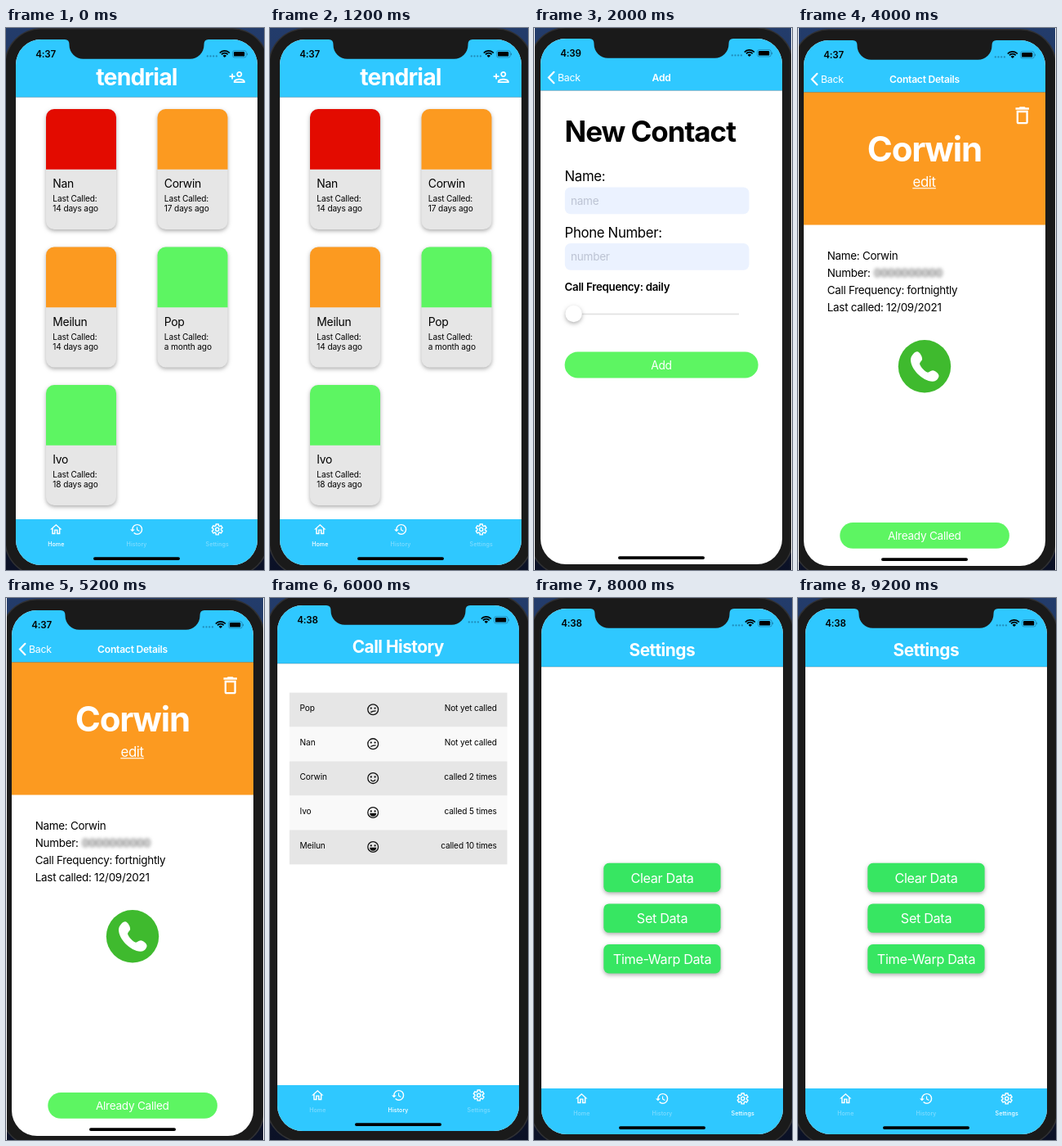
Write an HTML page with a canvas that moves like this. It is 316 by 662 pixels and loops after 10000 ms.

```html
<!DOCTYPE html>
<html lang="en">
<head>
<meta charset="utf-8">
<title>Call reminder app</title>
<style>
html, body { margin: 0; width: 100%; height: 100%; overflow: hidden; background: #fff; }
canvas { display: block; width: 316px; height: 662px; }
</style>
</head>
<body>
<canvas id="stage"></canvas>
<script>
const W = 316, H = 662, HOLD = 2000;
const BLUE = '#2fc8ff', GREEN = '#5df562', ORANGE = '#fc9a20', RED = '#e30b00', GREY = '#e6e6e6';
const canvas = document.getElementById('stage');
const c = canvas.getContext('2d');
const dpr = window.devicePixelRatio || 1;
canvas.width = W * dpr;
canvas.height = H * dpr;

const ICON = {
  addPerson: new Path2D('M15 12c2.21 0 4-1.79 4-4s-1.79-4-4-4-4 1.79-4 4 1.79 4 4 4zm0-6c1.1 0 2 .9 2 2s-.9 2-2 2-2-.9-2-2 .9-2 2-2zm0 8c-2.67 0-8 1.34-8 4v2h16v-2c0-2.66-5.33-4-8-4zm-6 4c.22-.72 3.31-2 6-2 2.7 0 5.8 1.29 6 2H9zm-3-3v-3h3v-2H6V7H4v3H1v2h3v3z'),
  home: new Path2D('M12 5.69l5 4.5V18h-2v-6H9v6H7v-7.81l5-4.5M12 3L2 12h3v8h6v-6h2v6h6v-8h3L12 3z'),
  history: new Path2D('M13 3a9 9 0 0 0-9 9H1l3.89 3.89.07.14L9 12H6c0-3.87 3.13-7 7-7s7 3.13 7 7-3.13 7-7 7c-1.93 0-3.68-.79-4.94-2.06l-1.42 1.42A8.954 8.954 0 0 0 13 21a9 9 0 0 0 0-18zm-1 5v5l4.28 2.54.72-1.21-3.5-2.08V8H12z'),
  trash: new Path2D('M6 19c0 1.1.9 2 2 2h8c1.1 0 2-.9 2-2V7H6v12zM8 9h8v10H8V9zm7.5-5l-1-1h-5l-1 1H5v2h14V4z'),
  handset: new Path2D('M-9-18C-6-18-2-11-3-8C-4-6-6-5-6-3C-5 1 1 7 4 7.500C6 7.500 7 5 10 5C13 5 18 9 17.500 12C17 15 14 18.500 10 18.500C-3 18-17 3-17-8C-17-13-12-18-9-18Z')
};

function text(str, x, y, size, { weight = 400, color = '#000', align = 'left', track = -0.02 } = {}) {
  c.font = `${weight} ${size}px Inter, "Liberation Sans", sans-serif`;
  c.letterSpacing = `${size * track}px`;
  c.textAlign = align;
  c.fillStyle = color;
  c.fillText(str, x, y);
}

function rect(x, y, w, h, color) {
  c.fillStyle = color;
  c.fillRect(x, y, w, h);
}

function pill(x, y, w, h, r, color) {
  c.fillStyle = color;
  c.beginPath();
  c.roundRect(x, y, w, h, r);
  c.fill();
}

function disc(x, y, r, color) {
  c.fillStyle = color;
  c.beginPath();
  c.arc(x, y, r, 0, Math.PI * 2);
  c.fill();
}

function line(points, width, color) {
  c.strokeStyle = color;
  c.lineWidth = width;
  c.beginPath();
  points.forEach(([x, y]) => c.lineTo(x, y));
  c.stroke();
}

function withShadow(draw, alpha = 0.32) {
  c.save();
  c.shadowColor = `rgba(0,0,0,${alpha})`;
  c.shadowBlur = 5 * dpr;
  c.shadowOffsetY = 2 * dpr;
  draw();
  c.restore();
}

function icon(path, x, y, size) {
  c.save();
  c.translate(x, y);
  c.scale(size / 24, size / 24);
  c.fillStyle = '#fff';
  c.fill(path);
  c.restore();
}

function gear(x, y, size) {
  const k = size / 24;
  c.strokeStyle = '#fff';
  c.lineWidth = 2 * k;
  c.lineJoin = 'round';
  c.beginPath();
  for (let i = 0; i < 6; i++) {
    const mid = i * Math.PI / 3 + Math.PI / 2;
    [[-0.36, 6.6], [-0.24, 9.2], [0.24, 9.2], [0.36, 6.6]].forEach(([a, r]) =>
      c.lineTo(x + Math.cos(mid + a) * r * k, y + Math.sin(mid + a) * r * k));
  }
  c.closePath();
  c.stroke();
  c.beginPath();
  c.arc(x, y, 2.9 * k, 0, Math.PI * 2);
  c.stroke();
}

// Phone body and clipped screen; content is drawn in stage coordinates.
function phone(ox, oy, time, content) {
  const sky = c.createLinearGradient(0, 0, 0, H);
  sky.addColorStop(0, '#233c6b');
  sky.addColorStop(1, '#0b1126');
  rect(0, 0, W, H, sky);
  pill(ox - 14, oy - 14, 324, 670, 45, '#303134');
  pill(ox - 12.5, oy - 12.5, 321, 667, 43.5, '#1a1a1a');

  c.save();
  c.beginPath();
  c.roundRect(ox, oy, 296, 642, 31);
  c.clip();
  rect(ox, oy, 296, 642, '#fff');
  content();
  statusBar(ox, oy, time);
  pill(ox + 95, oy + 632.2, 106, 3.8, 1.9, '#000');
  c.restore();
}

function statusBar(ox, oy, time) {
  c.save();
  c.translate(ox, oy);
  c.fillStyle = '#1a1a1a';
  c.beginPath();
  c.moveTo(60, -1);
  c.lineTo(60, 0);
  c.quadraticCurveTo(65.5, 0, 65.5, 6);
  c.arcTo(65.5, 23.7, 84, 23.7, 17);
  c.arcTo(230.5, 23.7, 230.5, 6, 17);
  c.lineTo(230.5, 6);
  c.quadraticCurveTo(230.5, 0, 236, 0);
  c.lineTo(236, -1);
  c.fill();
  text(time, 24.3, 22, 11.6, { weight: 600 });
  for (let i = 0; i < 4; i++) disc(234.8 + i * 3.7, 20.4, 1.15, 'rgba(0,30,60,.35)');
  c.strokeStyle = '#000';
  c.lineWidth = 1.7;
  [8, 5.1].forEach(r => {
    c.beginPath();
    c.arc(255.8, 21.8, r, -Math.PI * 0.77, -Math.PI * 0.23);
    c.stroke();
  });
  c.fillStyle = '#000';
  c.beginPath();
  c.moveTo(255.8, 22);
  c.arc(255.8, 21.8, 2.9, -Math.PI * 0.77, -Math.PI * 0.23);
  c.fill();
  c.strokeStyle = 'rgba(0,30,60,.4)';
  c.lineWidth = 0.8;
  c.beginPath();
  c.roundRect(265.6, 13.6, 16.6, 8.4, 2.3);
  c.stroke();
  pill(267, 15, 13.2, 5.6, 1.2, '#000');
  pill(283, 16.4, 1, 2.8, 0.5, 'rgba(0,30,60,.4)');
  c.restore();
}

function header(ox, oy, h) {
  rect(ox, oy, 296, h, BLUE);
  rect(ox, oy + h - 0.3, 296, 0.7, 'rgba(60,90,110,.45)');
}

function navHeader(ox, oy, title) {
  header(ox, oy, 63.3);
  c.lineCap = 'round';
  line([[ox + 16.4, oy + 40.8], [ox + 10, oy + 47.5], [ox + 16.4, oy + 54.2]], 2.2, '#fff');
  c.lineCap = 'butt';
  text('Back', ox + 21, oy + 51.9, 12.3, { color: '#fff' });
  text(title, ox + 148, oy + 51.8, 12.1, { weight: 600, color: '#fff', align: 'center' });
}

function tabBar(ox, oy, active) {
  rect(ox, oy + 586, 296, 56, BLUE);
  const y = oy + 598.4, size = 17.4;
  ['Home', 'History', 'Settings'].forEach((label, i) => {
    const x = ox + 49.3 + i * 98.7;
    if (i === 2) gear(x, y, size);
    else icon(i ? ICON.history : ICON.home, x - size / 2, y - size / 2, size);
    text(label, x, oy + 618.7, 7.1, {
      weight: 500, align: 'center', track: 0.01,
      color: i === active ? '#fff' : '#7fdcff'
    });
  });
}

function card(x, y, color, name, ago) {
  withShadow(() => pill(x, y, 86, 147, 10, GREY));
  pill(x, y, 86, 73.7, [10, 10, 0, 0], color);
  text(name, x + 8.3, y + 96.3, 13.9);
  text('Last Called:', x + 8.3, y + 113, 10.1, { track: -0.012 });
  text(ago, x + 8.3, y + 125, 10.1, { track: -0.012 });
}

function homeScreen() {
  const ox = 12, oy = 14;
  phone(ox, oy, '4:37', () => {
    header(ox, oy, 70.5);
    text('tendrial', 160, 70, 28.4, { weight: 700, color: '#fff', align: 'center', track: -0.03 });
    icon(ICON.addPerson, 272.8, 49.6, 20.8);
    [
      [RED, 'Nan', '14 days ago'], [ORANGE, 'Corwin', '17 days ago'],
      [ORANGE, 'Meilun', '14 days ago'], [GREEN, 'Pop', 'a month ago'],
      [GREEN, 'Ivo', '18 days ago']
    ].forEach((d, i) => card(49 + (i % 2) * 136.5, 99 + Math.floor(i / 2) * 168.5, ...d));
    tabBar(ox, oy, 0);
  });
}

function addScreen() {
  const ox = 8, oy = 13;
  phone(ox, oy, '4:39', () => {
    navHeader(ox, oy, 'Add');
    text('New Contact', 37.5, 139.3, 35, { weight: 700, track: -0.03 });
    [['Name:', 'name', 187], ['Phone Number:', 'number', 255.6]].forEach(([label, hint, y]) => {
      text(label, 37.5, y, 16.8);
      pill(37.8, y + 7.4, 225.7, 32.8, 7, '#ebf2ff');
      text(hint, 45, y + 28.8, 13.6, { color: '#bcc3d3' });
    });
    text('Call Frequency: daily', 37.5, 320.8, 13.3, { weight: 600 });
    rect(48, 348.6, 203, 1.7, '#e2e2e2');
    withShadow(() => disc(48.6, 349, 10.2, '#fff'), 0.3);
    pill(37.6, 395.5, 237, 32, 16, GREEN);
    text('Add', 156, 416.5, 13.8, { color: '#fff', align: 'center' });
  });
  edges();
}

function detailScreen() {
  const ox = 7, oy = 15;
  phone(ox, oy, '4:37', () => {
    rect(ox, oy + 63, 296, 162.5, ORANGE);
    navHeader(ox, oy, 'Contact Details');
    icon(ICON.trash, 260.6, 92.6, 28.2);
    text('Corwin', 154.8, 162.6, 42, { weight: 700, color: '#fff', align: 'center', track: -0.03 });
    text('edit', 154.6, 193.5, 16.8, { color: '#fff', align: 'center' });
    rect(140.3, 195.2, 28.6, 1.1, '#fff');
    ['Name: Corwin', 'Number: ', 'Call Frequency: fortnightly', 'Last called: 12/09/2021']
      .forEach((s, i) => text(s, 35.8, 283.4 + i * 20.8, 13.4));
    c.save();
    c.filter = `blur(${1.9 * dpr}px)`;
    text('0000000000', 93, 304.2, 13.4, { weight: 500, color: '#555' });
    c.restore();
    disc(155, 413.3, 32.2, '#3fba2e');
    icon(ICON.handset, 155, 413.3, 24);
    pill(51.3, 604, 207.6, 31.8, 15.9, GREEN);
    text('Already Called', 154.8, 625, 13.6, { color: '#fff', align: 'center' });
  });
  edges();
}

// Thin light margins beside the two narrower screens.
function edges() {
  rect(0, 0, 1, H, '#fff');
  rect(315, 0, 1, H, '#fff');
}

function face(x, y, mood) {
  c.strokeStyle = '#111';
  c.lineWidth = 1.3;
  c.beginPath();
  c.arc(x, y, 6.4, 0, Math.PI * 2);
  c.stroke();
  disc(x - 2.4, y - 1.6, 1.15, '#111');
  disc(x + 2.4, y - 1.6, 1.15, '#111');
  c.beginPath();
  if (mood === 'unsure') {
    c.moveTo(x - 3, y + 3.4);
    c.quadraticCurveTo(x - 0.5, y + 1.8, x + 3.4, y + 1.7);
    c.stroke();
  } else if (mood === 'smile') {
    c.arc(x, y + 0.6, 3, Math.PI * 0.12, Math.PI * 0.88);
    c.stroke();
  } else {
    c.fillStyle = '#111';
    c.arc(x, y + 0.7, 4, 0, Math.PI);
    c.fill();
  }
}

function historyScreen() {
  const ox = 9, oy = 9;
  phone(ox, oy, '4:38', () => {
    header(ox, oy, 71);
    text('Call History', 156.8, 67, 20.9, { weight: 700, color: '#fff', align: 'center', track: -0.025 });
    [
      ['Pop', 'unsure', 'Not yet called'], ['Nan', 'unsure', 'Not yet called'],
      ['Corwin', 'smile', 'called 2 times'], ['Ivo', 'grin', 'called 5 times'],
      ['Meilun', 'grin', 'called 10 times']
    ].forEach(([name, mood, status], i) => {
      const y = 115.6 + i * 41.95;
      rect(23.8, y, 266.7, 42, i % 2 ? '#f9f9f9' : GREY);
      text(name, 36.6, y + 22.8, 10.1, { track: -0.012 });
      face(126.2, y + 20.6, mood);
      text(status, 277.8, y + 22.8, 10.1, { align: 'right', track: -0.012 });
    });
    tabBar(ox, oy, 1);
  });
}

function settingsScreen() {
  const ox = 9, oy = 13;
  phone(ox, oy, '4:38', () => {
    header(ox, oy, 71);
    text('Settings', 156.8, 71, 20.9, { weight: 700, color: '#fff', align: 'center', track: -0.025 });
    ['Clear Data', 'Set Data', 'Time-Warp Data'].forEach((label, i) => {
      const y = 323.8 + i * 49.6;
      withShadow(() => pill(85.3, y, 143.3, 35.4, 6.5, '#37e662'));
      text(label, 157, y + 23.7, 16.2, { color: '#fff', align: 'center' });
    });
    tabBar(ox, oy, 2);
  });
}

const screens = [homeScreen, addScreen, detailScreen, historyScreen, settingsScreen];
const start = performance.now();

function draw() {
  const t = Math.max(0, performance.now() - start);
  c.setTransform(dpr, 0, 0, dpr, 0, 0);
  screens[Math.floor(t / HOLD) % screens.length]();
  requestAnimationFrame(draw);
}
draw();
</script>
</body>
</html>
```
